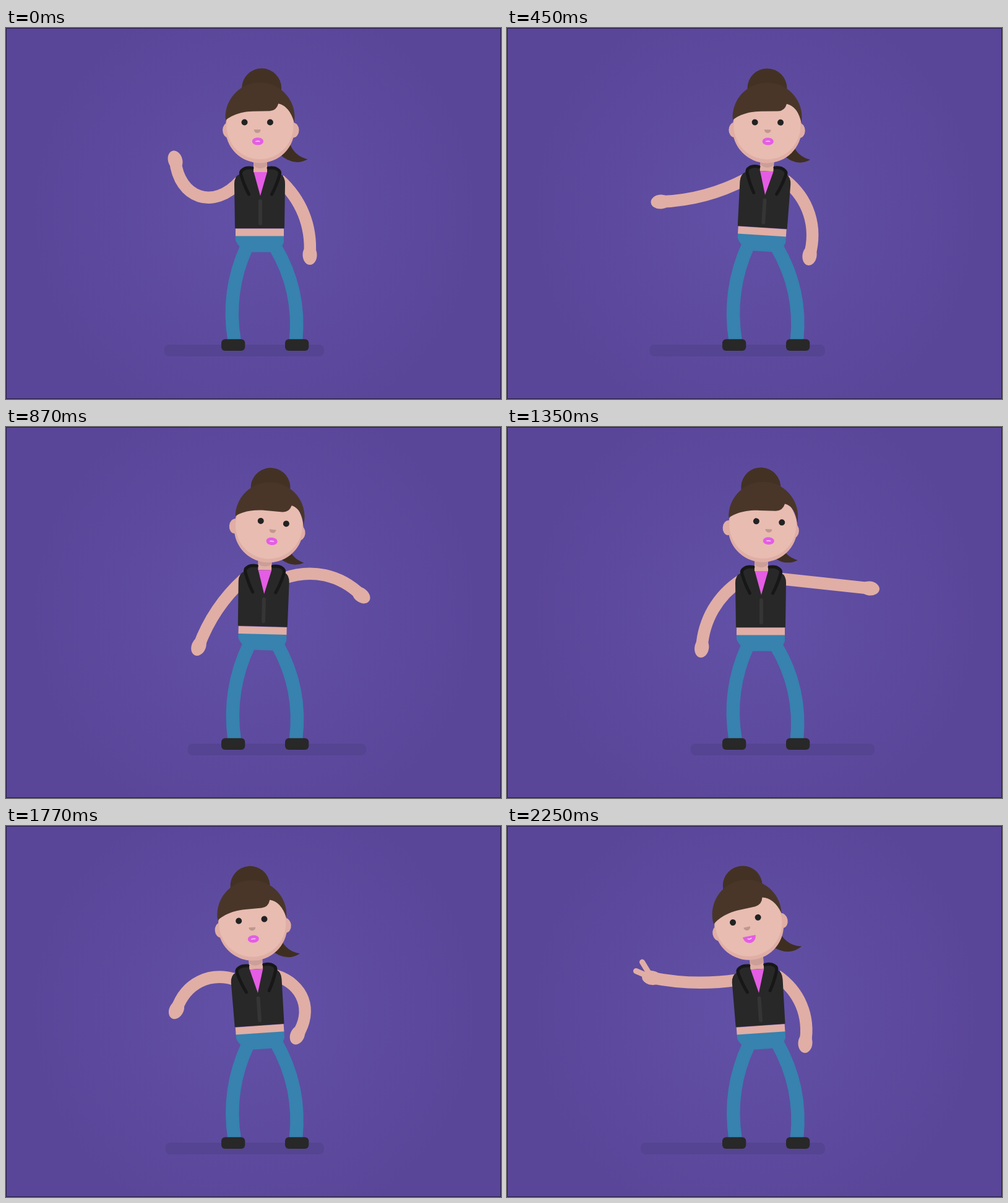
These frames come from a looping animation (800 px wide and 600 px high, 2820 ms). An HTML page with a canvas:

```html
<!DOCTYPE html>
<html lang="en">
<head>
<meta charset="utf-8">
<title>Dancer</title>
<style>
  html, body { margin: 0; width: 100%; height: 100%; overflow: hidden; background: #5a4699; }
  canvas { display: block; }
</style>
</head>
<body>
<canvas id="stage" width="800" height="600"></canvas>
<script>
const ctx = document.getElementById('stage').getContext('2d');
const LOOP = 2820, STEP = 30;
const SKIN = '#e0aea5', FACE = '#e8bcb1', HAIR = '#493629', BUN = '#433224',
  JEANS = '#3782ae', VEST = '#282828', PINK = '#e45de4';

// The dance moves. tilt: body lean, sway: hip shift, nod: head lean, turn: face shift,
// left and right: hand x, hand y, height of the arm's bow.
const poses = [
  { t: 0, tilt: 0, sway: 0, nod: 0, turn: -4.3, left: [273.5, 214, -43], right: [491, 367, -15.5] },
  { t: 450, tilt: 3.65, sway: 2, nod: 0.6, turn: 0.9, left: [248.5, 281, -8], right: [489, 368, -20] },
  { t: 870, tilt: 1.5, sway: 4.5, nod: 6.3, turn: 6.7, left: [311.5, 354.5, 8], right: [574, 272, -19] },
  { t: 1350, tilt: 0, sway: 0, nod: 2.7, turn: 9.8, left: [314.7, 357, 15], right: [586, 261, 0] },
  { t: 1620, tilt: 1.5, sway: 0.5, nod: 10.5, turn: -0.6, left: [331, 344, 37], right: [493.5, 309, -50] },
  { t: 1770, tilt: -4, sway: 0.5, nod: -4.2, turn: -1.1, left: [275.5, 297, 24], right: [471, 338, -28] },
  { t: 2190, tilt: -4, sway: 0.5, nod: -11.4, turn: -4, left: [234, 245.5, -6], right: [482, 351, -18] }
];

const rad = deg => deg * Math.PI / 180;

// Speed of one value as it passes a pose; it rests where the value is held
function speed(i, get) {
  const a = poses[Math.max(0, i - 1)], b = poses[i], c = poses[i + 1];
  return !c || get(b) === get(c) ? 0 : (get(c) - get(a)) / (c.t - a.t);
}

// Smooth curve of one value through all poses
function follow(t, get) {
  const i = poses.findLastIndex(p => p.t <= t), a = poses[i], b = poses[i + 1];
  if (!b) return get(a);
  const span = b.t - a.t, u = (t - a.t) / span, w = u * u * (3 - 2 * u);
  return get(a) * (1 - w) + get(b) * w
    + span * u * (1 - u) * ((1 - u) * speed(i, get) - u * speed(i + 1, get));
}

function poseAt(t) {
  const value = name => follow(t, p => p[name]);
  const hand = side => [0, 1, 2].map(n => follow(t, p => p[side][n]));
  return {
    tilt: value('tilt'), sway: value('sway'), nod: value('nod'), turn: value('turn'),
    left: hand('left'), right: hand('right')
  };
}

const ramp = (t, from, to) => {
  const u = Math.min(1, Math.max(0, (t - from) / (to - from)));
  return u * u * (3 - 2 * u);
};

function fill(path, color) {
  ctx.fillStyle = color;
  ctx.fill(new Path2D(path));
}

function stroke(path, color, width, cap = 'round') {
  ctx.strokeStyle = color;
  ctx.lineWidth = width;
  ctx.lineCap = cap;
  ctx.lineJoin = 'round';
  ctx.stroke(new Path2D(path));
}

function ellipse(x, y, rx, ry, color, angle = 0, end = Math.PI * 2) {
  ctx.beginPath();
  ctx.ellipse(x, y, rx, ry, angle, 0, end);
  ctx.fillStyle = color;
  ctx.fill();
}

function roundBox(x, y, w, h, r, color) {
  ctx.beginPath();
  ctx.roundRect(x, y, w, h, r);
  ctx.fillStyle = color;
  ctx.fill();
}

function within(x, y, tilt, draw) {
  ctx.save();
  ctx.translate(x, y);
  ctx.rotate(rad(tilt));
  draw();
  ctx.restore();
}

const hips = ({ tilt, sway }) => [410 + sway, 336 - 1.6 * Math.min(1, Math.abs(tilt))];

// Where a point of the upright body lands on the leaning body
function onBody(pose, x, y) {
  const [hx, hy] = hips(pose), dx = x - 410, dy = y - 336;
  const c = Math.cos(rad(pose.tilt)), s = Math.sin(rad(pose.tilt));
  return [hx + dx * c - dy * s, hy + dx * s + dy * c];
}

// Rubber limb that bows sideways between two points; returns the angle of its end
function limb([x0, y0], [x1, y1], bow, color, width) {
  const dx = x1 - x0, dy = y1 - y0, len = Math.hypot(dx, dy), k = 2 * bow / len;
  const along = (1 - k * k / 2) / 3, side = 4 / 3 * bow / len;
  const ax = x0 + dx * along - dy * side, ay = y0 + dy * along + dx * side;
  const bx = x1 - dx * along - dy * side, by = y1 - dy * along + dx * side;
  stroke(`M${x0},${y0} C${ax},${ay} ${bx},${by} ${x1},${y1}`, color, width, 'butt');
  return Math.atan2(y1 - (ay + 3 * by) / 4, x1 - (ax + 3 * bx) / 4);
}

const backdrop = ctx.createRadialGradient(402, 300, 0, 402, 300, 360);
backdrop.addColorStop(0, '#6251a7');
backdrop.addColorStop(1, '#5a4699');

function drawStage({ left, right }) {
  ctx.fillStyle = backdrop;
  ctx.fillRect(0, 0, 800, 600);
  const from = left[0] - 18, to = Math.max(514, right[0] + 8);
  roundBox(from, 512, to - from, 19, 8, '#554491');
}

function drawArm(shoulder, [x, y, bow]) {
  const angle = limb(shoulder, [x, y], bow, SKIN, 19.5);
  ellipse(x, y, 16, 11.5, SKIN, angle);
}

function drawFingers([x, y], grow) {
  if (!grow) return;
  const finger = (dx, dy) => stroke(`M${x},${y} l${dx * grow},${dy * grow}`, SKIN, 9);
  finger(-15.5, -25.5);
  finger(-25.5, -11);
}

function drawLegs(pose) {
  limb(onBody(pose, 389, 354), [369, 505], 11.5, JEANS, 21.5);
  limb(onBody(pose, 435, 354), [468.5, 505], -12.5, JEANS, 21.5);
  for (const x of [348, 451]) roundBox(x, 503.3, 38.3, 18.7, 6, VEST);
}

function drawBody(pose) {
  within(...hips(pose), pose.tilt, () => {
    ctx.translate(-410, -336);
    ctx.save();
    ctx.beginPath();
    ctx.rect(400, 208, 22, 27);
    ctx.fillStyle = SKIN;
    ctx.fill();
    ctx.clip();
    ellipse(411, 214, 14, 13, '#cb9f98');
    ctx.restore();

    fill('M371,336 H449 V346 Q448,350 445,354 Q440,362.5 431,362.5 H399 Q382,362 378,354 Q371,346 371,342Z', JEANS);
    fill('M371,324.5 H449 V336.5 H371Z', SKIN);
    fill('M370,324 L369,252 Q369,240 378,236 L384,227 H400 V233 H422 V227 H438 L443,236 Q451,240 451,252 L450,324Z', VEST);
    fill('M400.5,233 H422 L411,271.5Z', PINK);
    for (const side of [-1, 1]) {
      ctx.save();
      ctx.translate(411, 0);
      ctx.scale(side, 1);
      stroke('M13,226.5 Q23,225 28,229 Q33,232 31,238 Q26,255 18.5,269', '#171717', 5);
      ctx.restore();
    }
    stroke('M411,280 V316', '#353535', 6);
  });
}

// The head leans about the neck
function onHead(pose, draw) {
  const [neck] = onBody(pose, 410.5, 222);
  within(neck + 60 * Math.sin(rad(pose.nod)), 162.3 + 0.14 * pose.nod, pose.nod, draw);
}

function drawPonytail(pose) {
  onHead(pose, () => {
    ctx.translate(-1.3 * pose.turn, 0);
    fill('M43,26 Q51,45 71.5,50 Q48,63 24,40Z', '#3e2e22');
  });
}

function drawMouth(smile) {
  const w = 9 + 1.5 * smile, corner = -4 * smile, top = -8 + 4 * smile, low = 8 + 3 * smile;
  fill(`M${-w},${corner} C${-w},${top} ${w},${top} ${w},${corner}
        C${w - smile},${low} ${smile - w},${low} ${-w},${corner}Z`, PINK);
  stroke(`M-2.8,0 Q0,${-0.6 + 2.6 * smile} 2.8,0`, '#f3bdf0', 1.8);
}

function drawHead(pose, smile) {
  const { turn } = pose;
  onHead(pose, () => {
    ellipse(-0.62 * turn, -65, 32, 32, BUN);
    for (const side of [-1, 1]) ellipse(side * 52.7 - 0.3 * turn, 3, 9, 12, SKIN);
    ellipse(0, 0, 56, 56, SKIN);
    ellipse(0, -4, 54, 54, FACE);

    const f = 31 + 0.3 * turn;
    fill(`M-55.5,-13 L-56,-18 A56,56 0 0 1 56,-18 L55.5,-9
          Q${f + 18},-36 ${f},-40 Q${f - 3},-28.5 ${f - 14},-28
          L${f - 41},-27.5 C-35,-27 -50,-18 -55.5,-13Z`, HAIR);

    ctx.translate(turn, 0);
    for (const side of [-1, 1]) ellipse(side * 20.7, -9.8, 5, 5, '#222');
    ellipse(0, 2, 5.5, 5.5, '#c0978f', 0, Math.PI);
    ctx.translate(0.7, 21);
    drawMouth(smile);
  });
}

function drawBorder() {
  ctx.strokeStyle = '#251d40';
  ctx.lineWidth = 1;
  ctx.strokeRect(0.5, 0.5, 799, 599);
}

function render(t) {
  const pose = poseAt(t);
  drawStage(pose);
  drawPonytail(pose);
  drawFingers(pose.left, ramp(t, 2040, 2220));
  drawArm(onBody(pose, 378, 248), pose.left);
  drawArm(onBody(pose, 442, 245.5), pose.right);
  drawLegs(pose);
  drawBody(pose);
  drawHead(pose, ramp(t, 1980, 2220));
  drawBorder();
}

const start = performance.now();
function tick() {
  const t = Math.max(0, performance.now() - start) % LOOP;
  render(Math.floor(t / STEP) * STEP);
  requestAnimationFrame(tick);
}
tick();
</script>
</body>
</html>
```
